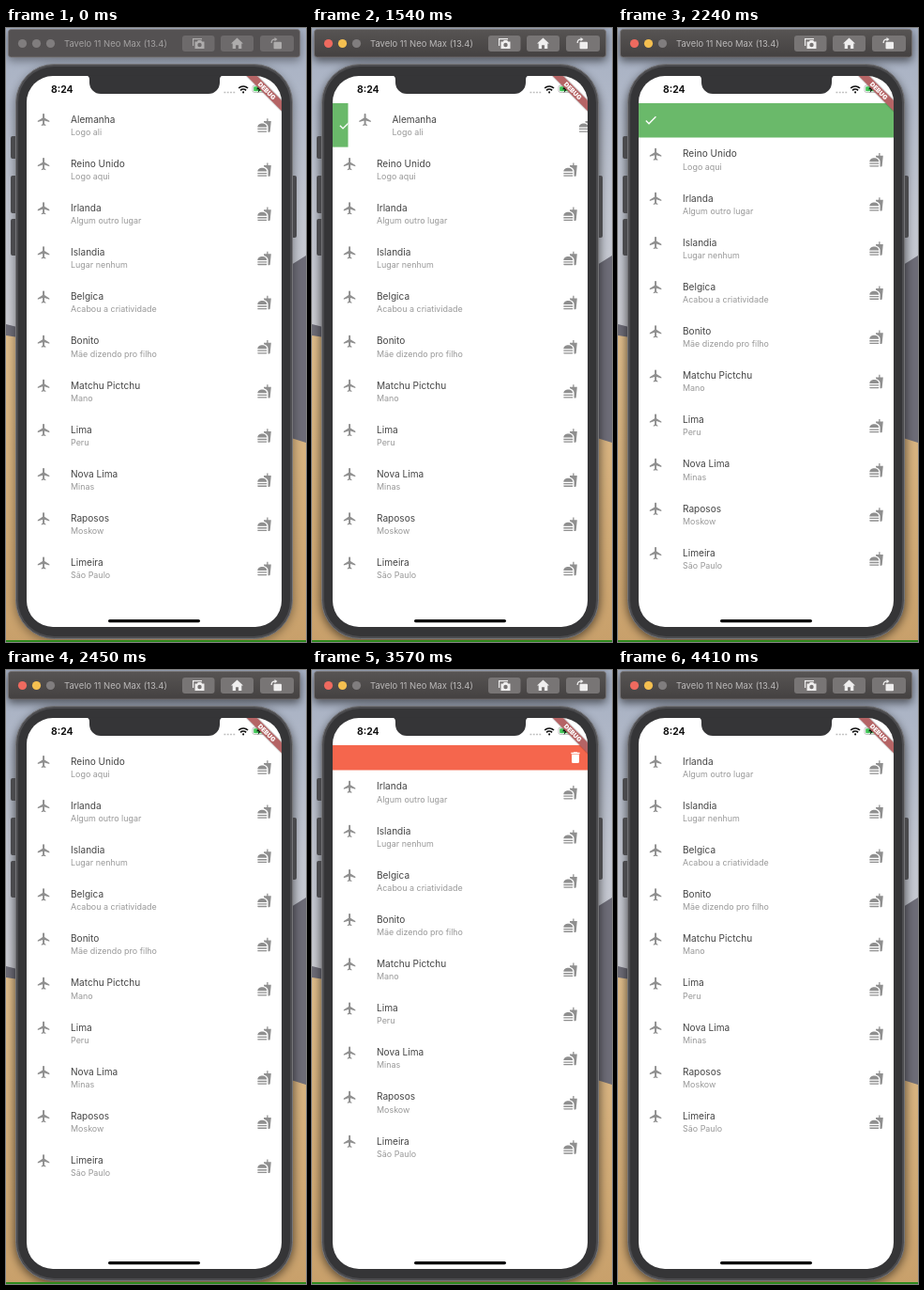
These frames come from a looping animation (320 by 653 pixels, 4.69 s). An HTML page:

```html
<!DOCTYPE html>
<html lang="pt">
<head>
<meta charset="utf-8">
<title>Swipe list</title>
<style>
  html, body { margin: 0; height: 100%; overflow: hidden; }
  svg { display: block; width: 100vw; height: 100vh; font-family: Inter, Roboto, sans-serif; }
  .title { font-size: 10.1px; fill: #444; }
  .subtitle { font-size: 8.95px; fill: #989898; }
  .icon { fill: #8f8f8f; }
  .shadow { opacity: .35; filter: url(#blur); }
  .bar { fill: #545152; }
  .button { fill: #6d6a6b; }
  .glyph { fill: #aeacac; }
  .heading { font-size: 9.45px; fill: #a3a1a1; }
  .light { fill: #807d7e; }
  .active .shadow { opacity: .55; }
  .active .bar { fill: url(#barActive); }
  .active .button { fill: #787575; }
  .active .glyph { fill: #efeeee; }
  .active .heading { fill: #bbb9b9; }
  .active .red { fill: #ee6a5f; }
  .active .yellow { fill: #f4bf50; }
</style>
</head>
<body>
<svg id="stage" viewBox="0 0 320 653" preserveAspectRatio="none">
  <defs>
    <linearGradient id="sky" x2="0" y2="1">
      <stop offset="0" stop-color="#a5afc2"/><stop offset=".5" stop-color="#c1c5cf"/><stop offset="1" stop-color="#d0cfd3"/>
    </linearGradient>
    <linearGradient id="sand" x2="0" y2="1">
      <stop offset="0" stop-color="#dfbd8b"/><stop offset="1" stop-color="#c8a06b"/>
    </linearGradient>
    <linearGradient id="barActive" x2="0" y2="1">
      <stop offset="0" stop-color="#575453"/><stop offset="1" stop-color="#444141"/>
    </linearGradient>
    <clipPath id="screen"><rect x="22" y="51" width="272" height="586" rx="28"/></clipPath>
    <filter id="blur" x="-20%" y="-40%" width="140%" height="180%"><feGaussianBlur stdDeviation="5"/></filter>
    <filter id="softBlur"><feGaussianBlur stdDeviation="1.5"/></filter>
    <path id="plane" d="M21 16v-2l-8-5V3.5C13 2.67 12.33 2 11.5 2S10 2.67 10 3.5V9l-8 5v2l8-2.5V19l-2 1.5V22l3.5-1 3.5 1v-1.5L13 19v-5.5z"/>
    <path id="food" d="M18.06 23h1.66c.84 0 1.53-.64 1.63-1.46L23 5.05h-5V1h-1.97v4.05h-4.97l.3 2.34c1.71.47 3.31 1.32 4.27 2.26 1.44 1.42 2.43 2.89 2.43 5.29zM1 22v-1h15v1q0 1-1 1H2q-1 0-1-1zm15-7c0-8-15-8-15 0zM1 17h15v2H1z"/>
    <path id="check" d="M9 16.17 4.83 12l-1.42 1.41L9 19 21 7l-1.41-1.41z"/>
    <path id="trash" d="M6 19q0 2 2 2h8q2 0 2-2V7H6zM19 4h-3.5l-1-1h-5l-1 1H5v2h14z"/>
  </defs>

  <!-- wallpaper -->
  <rect width="320" height="400" fill="url(#sky)"/>
  <path d="M0 315l12 3v20H0zM304 252l16-10V450H304z" fill="#6d6c77"/>
  <path d="M0 327l20 3 284 106 16 5V653H0z" fill="url(#sand)"/>

  <!-- simulator toolbar -->
  <rect class="shadow" x="2" y="4" width="312" height="31" rx="4"/>
  <rect class="bar" x="2.5" y="1.5" width="311" height="29.5" rx="3" stroke="#7b7878" stroke-width=".7"/>
  <circle class="light red" cx="17.5" cy="16.5" r="4.6"/>
  <circle class="light yellow" cx="32.5" cy="16.5" r="4.6"/>
  <circle class="light" cx="47.5" cy="16.5" r="4.6"/>
  <text class="heading" x="62" y="20">Tavelo 11 Neo Max (13.4)</text>
  <g class="button">
    <rect x="188" y="8" width="34.5" height="17" rx="3"/>
    <rect x="229" y="8" width="35" height="17" rx="3"/>
    <rect x="271" y="8" width="36" height="17" rx="3"/>
  </g>
  <g class="glyph">
    <path d="M199 11h10v1.2h-8.800v6.800H199zM201.500 14.500h2.300l1-1.500h3.400l1 1.500h2.300v7.500h-10z"/>
    <path d="M246.500 10.500l6.500 6h-1.700v5.500h-3.300v-3.700h-3V22h-3.300v-5.500H240z"/>
    <rect x="285.500" y="14.800" width="8.500" height="7.400" rx="1"/>
    <path d="M282.500 16q0-4.500 4-4.500v-1.500l3 2.100-3 2.100v-1.500q-2.700 0-2.700 3.300z"/>
  </g>
  <circle class="button" cx="206.500" cy="18" r="2.200"/>

  <!-- phone -->
  <rect class="shadow" x="9" y="41" width="298" height="612" rx="44"/>
  <rect y="651" width="320" height="2" fill="#2f8a1e"/>
  <path d="M5 117q0-2 2-2h4v24H7q-2 0-2-2zM5 159q0-2 2-2h4v40H7q-2 0-2-2zM5 205q0-2 2-2h4v39H7q-2 0-2-2zM305 157h3q2 0 2 2v62q0 2-2 2h-3z" fill="#4a4a4d"/>
  <rect x="10.500" y="38.500" width="295" height="611" rx="41" fill="#4c4c4f" stroke="#757578"/>
  <rect x="13" y="41" width="290" height="606" rx="38.500" fill="#353537"/>
  <g clip-path="url(#screen)">
    <rect x="22" y="51" width="272" height="586" fill="#fff"/>
    <g id="list"></g>
    <text x="48" y="69" font-size="10.400" font-weight="700" fill="#111">8:24</text>
    <path d="M232.500 68.500h12" stroke="#bbb" stroke-width="1.600" stroke-dasharray="1.800 1.500"/>
    <g fill="none" stroke="#111" stroke-width="1.700">
      <path d="M248.200 64a7 7 0 0 1 9.800 0M250.100 66.300a4.300 4.300 0 0 1 6 0"/>
      <path d="M253.100 68.200v.3" stroke-width="2" stroke-linecap="round"/>
    </g>
    <rect x="263" y="61" width="14" height="7.500" rx="2" fill="#fff" stroke="#aaa" stroke-width=".7"/>
    <rect x="264.200" y="62.200" width="10" height="5.100" rx="1" fill="#43c759"/>
    <path d="M271 60.500l-4 4.700h2.600l-1 3.800 4-4.800H270z" fill="#111"/>
    <g transform="translate(278.200 66.800) rotate(45)">
      <rect x="-30" y="-3.900" width="60" height="7.900" opacity=".4" filter="url(#softBlur)"/>
      <rect x="-30" y="-3.900" width="60" height="7.900" fill="#b56465"/>
      <text y="2.400" font-size="6.700" font-weight="900" text-anchor="middle" fill="#fff">DEBUG</text>
    </g>
    <rect x="109" y="629" width="98" height="3.200" rx="1.600"/>
  </g>
  <path d="M85 50.500q4 0 4 4.500v3a12 12 0 0 0 12 12h115a12 12 0 0 0 12-12v-3q0-4.500 4-4.500z" fill="#353537"/>
</svg>

<script>
const LOOP = 4690, STEP = 70, ACTIVATE = 1050;
const TOP = 79.7, ROW = 47.15, LEFT = 22, WIDTH = 272, ICON = 0.657;

const places = [
  ['Alemanha', 'Logo ali'], ['Reino Unido', 'Logo aqui'], ['Irlanda', 'Algum outro lugar'],
  ['Islandia', 'Lugar nenhum'], ['Belgica', 'Acabou a criatividade'], ['Bonito', 'Mãe dizendo pro filho'],
  ['Matchu Pictchu', 'Mano'], ['Lima', 'Peru'], ['Nova Lima', 'Minas'], ['Raposos', 'Moskow'], ['Limeira', 'São Paulo'],
];

// One swipe per dismissed row: drag interval, direction, then collapse.
const swipes = [
  { start: 1450, end: 2080, collapse: 2090, side: 1, color: '#6ab96a', icon: 'check', iconX: 27.1 },
  { start: 3007, end: 3395, collapse: 3403, side: -1, color: '#f5664d', icon: 'trash', iconX: 273.1 },
];

const clamp = v => Math.min(1, Math.max(0, v));

// cubic-bezier(.25, .1, .25, 1), solved by bisection
function ease(x) {
  let low = 0, high = 1;
  for (let i = 0; i < 20; i++) {
    const s = (low + high) / 2;
    if (0.75 * s * (1 - s) + s ** 3 < x) low = s; else high = s;
  }
  return 0.3 * low * (1 - low) ** 2 + 3 * low * low * (1 - low) + low ** 3;
}

const icon = (name, x, y) => `<use href="#${name}" transform="translate(${x} ${y}) scale(${ICON})"/>`;

const list = document.getElementById('list');
list.innerHTML = places.map(([title, subtitle], i) => {
  const swipe = swipes[i];
  const back = swipe ? `<clipPath id="reveal${i}"><rect/></clipPath>
    <g class="back" clip-path="url(#reveal${i})">
      <rect x="${LEFT}" width="${WIDTH}" height="${ROW}" fill="${swipe.color}"/>
      <g class="mark" fill="#fff">${icon(swipe.icon, swipe.iconX, -ICON * 12)}</g>
    </g>` : '';
  return `<g class="row">${back}<g class="content">
    <g class="icon">${icon('plane', 32.5, 9.9)}${icon('food', 267.7, 15.9)}</g>
    <text class="title" x="69" y="21">${title}</text>
    <text class="subtitle" x="69" y="34.1">${subtitle}</text>
  </g></g>`;
}).join('');

const rows = [...list.querySelectorAll('.row')];
const stage = document.getElementById('stage');
const move = (node, x, y) => node.setAttribute('transform', `translate(${x} ${y})`);

function drawSwipe(row, swipe, t) {
  const shift = WIDTH * clamp((t - swipe.start) / (swipe.end - swipe.start)) ** 1.44;
  const progress = clamp((t - swipe.collapse) / 300);
  const height = ROW * (1 - ease(clamp((progress - 0.4) / 0.6)));
  const reveal = row.querySelector('clipPath rect');
  reveal.setAttribute('x', swipe.side > 0 ? LEFT : LEFT + WIDTH - shift);
  reveal.setAttribute('width', shift);
  reveal.setAttribute('height', height);
  row.querySelector('.back').style.display = shift < 1 || progress === 1 ? 'none' : '';
  move(row.querySelector('.mark'), 0, height / 2);
  move(row.querySelector('.content'), swipe.side * shift, 0);
  return progress === 1 ? 0 : height;
}

function draw(now) {
  const t = Math.floor(now % LOOP / STEP) * STEP;
  stage.classList.toggle('active', t >= ACTIVATE);
  let y = TOP;
  rows.forEach((row, i) => {
    move(row, 0, y);
    y += swipes[i] ? drawSwipe(row, swipes[i], t) : ROW;
  });
}

const begin = performance.now();
function tick() {
  draw(performance.now() - begin);
  requestAnimationFrame(tick);
}
tick();
</script>
</body>
</html>
```
